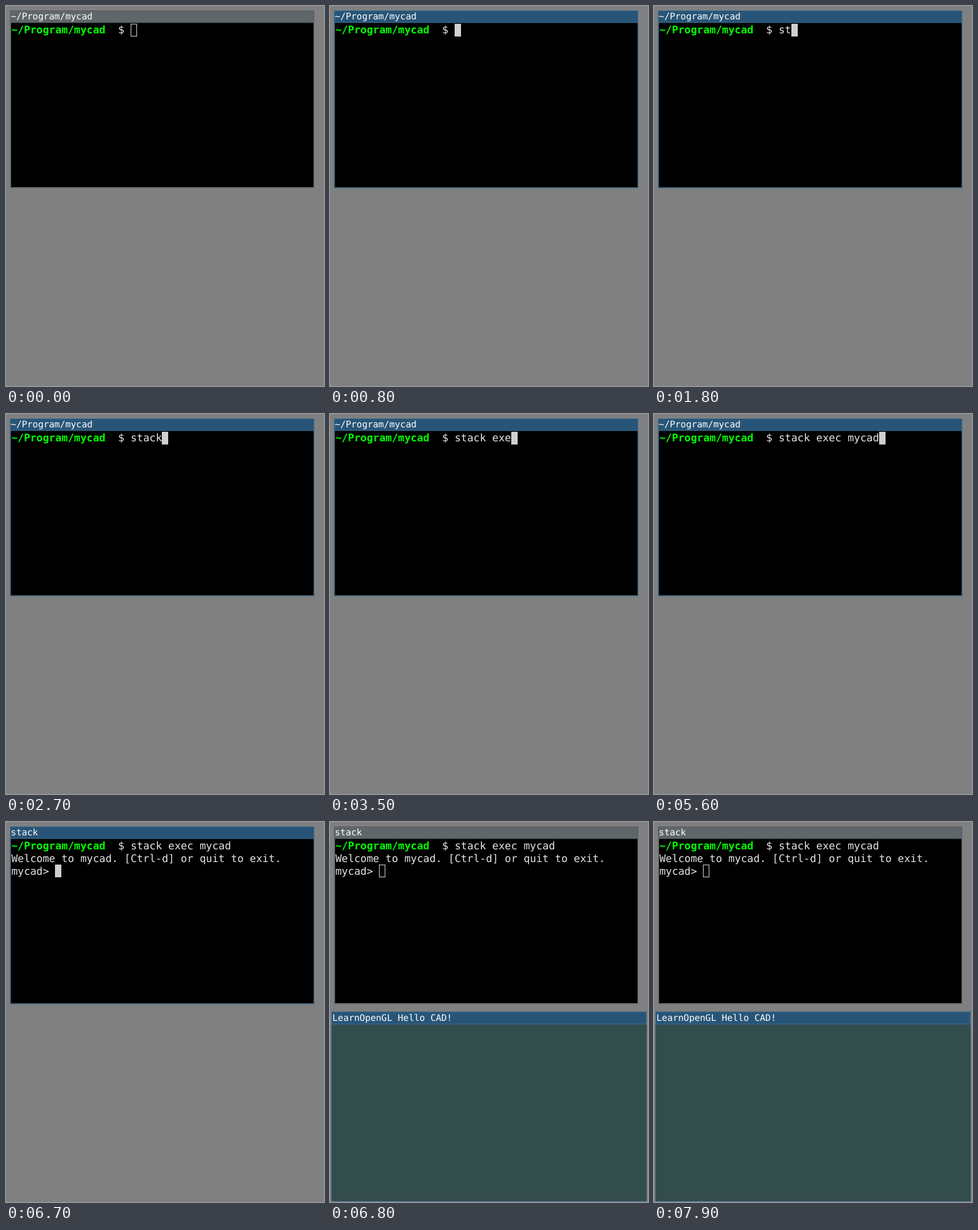
These frames come from a looping animation (500x598 px, 8 s). An HTML page:

```html
<!DOCTYPE html>
<html lang="en">
<head>
<meta charset="utf-8">
<title>Terminal session</title>
<style>
  html, body { margin: 0; width: 100%; height: 100%; overflow: hidden; background: #808080; }
  svg { display: block; width: 500px; height: 598px; }
  text { white-space: pre; text-rendering: geometricPrecision; font-family: "DejaVu Sans Mono", monospace; }
  .title { font-size: 14.22px; fill: #fff; }
  .term { font-size: 16.4px; fill: #e5e5e5; }
  .path { font-weight: bold; fill: #0f0; }
  .bar { fill: #285577; stroke: #4c7899; }
  .frame { fill: #285577; }
  .cursor { fill: #d0d0d0; stroke: #d0d0d0; }
  .idle .bar { fill: #5f676a; stroke: #4d5355; }
  .idle .frame { fill: #5f676a; }
  .idle .cursor { fill: none; }
</style>
</head>
<body>
<svg viewBox="0 0 500 598">
  <g id="terminal">
    <rect class="frame" x="6.5" y="7" width="478" height="279.5"/>
    <rect x="8" y="26.5" width="475.5" height="258.5"/>
    <rect class="bar" x="7" y="7.7" width="477" height="18.3" stroke-width=".6"/>
    <text class="title" id="title" x="7.6" y="21.4"></text>
    <text class="term" x="8.4" y="43.2"><tspan class="path">~/Program/mycad</tspan>  $ <tspan id="command"></tspan></text>
    <g id="output">
      <text class="term" x="8.4" y="62.9">Welcome to mycad. [Ctrl-d] or quit to exit.</text>
      <text class="term" x="8.4" y="82.6">mycad&gt; </text>
    </g>
    <rect class="cursor" id="cursor" width="9" height="19"/>
  </g>
  <g id="viewer">
    <rect class="frame" x="2.2" y="298.4" width="495.8" height="298.6"/>
    <rect x="3" y="318.5" width="494.3" height="277.7" fill="#334d4d"/>
    <rect class="bar" x="2.6" y="298.8" width="495" height="19.2" stroke-width=".7"/>
    <text class="title" x="3.8" y="313.2">LearnOpenGL Hello CAD!</text>
  </g>
</svg>
<script>
  const LOOP = 8000, FOCUS = 800, ENTER = 5900, READY = 6600, OPEN = 6800;
  const COMMAND = "stack exec mycad";
  const KEY_TIMES = [1700, 1800, 1900, 2100, 2700, 2900, 3100, 3200,
                     3500, 3600, 4300, 4800, 4900, 5100, 5500, 5600];
  const PROMPT_COLUMNS = 19, COLUMN = 9.873, ROW = 19.7;
  const el = id => document.getElementById(id);
  const show = (id, visible) => el(id).setAttribute("visibility", visible ? "visible" : "hidden");

  function placeCursor(column, row) {
    el("cursor").setAttribute("x", Math.round(8.3 + column * COLUMN) + 0.5);
    el("cursor").setAttribute("y", Math.round(28 + row * ROW) + 0.5);
  }

  function draw(t) {
    const typed = KEY_TIMES.filter(time => time <= t).length;
    el("terminal").classList.toggle("idle", t < FOCUS || t >= OPEN);
    el("title").textContent = t < ENTER ? "~/Program/mycad" : "stack";
    el("command").textContent = COMMAND.slice(0, typed);
    show("output", t >= READY);
    show("viewer", t >= OPEN);
    if (t < ENTER) placeCursor(PROMPT_COLUMNS + typed, 0);
    else if (t < READY) placeCursor(0, 1);
    else placeCursor(7, 2);
  }

  const start = performance.now();
  function tick() {
    draw((performance.now() - start) % LOOP);
    requestAnimationFrame(tick);
  }
  tick();
</script>
</body>
</html>
```
